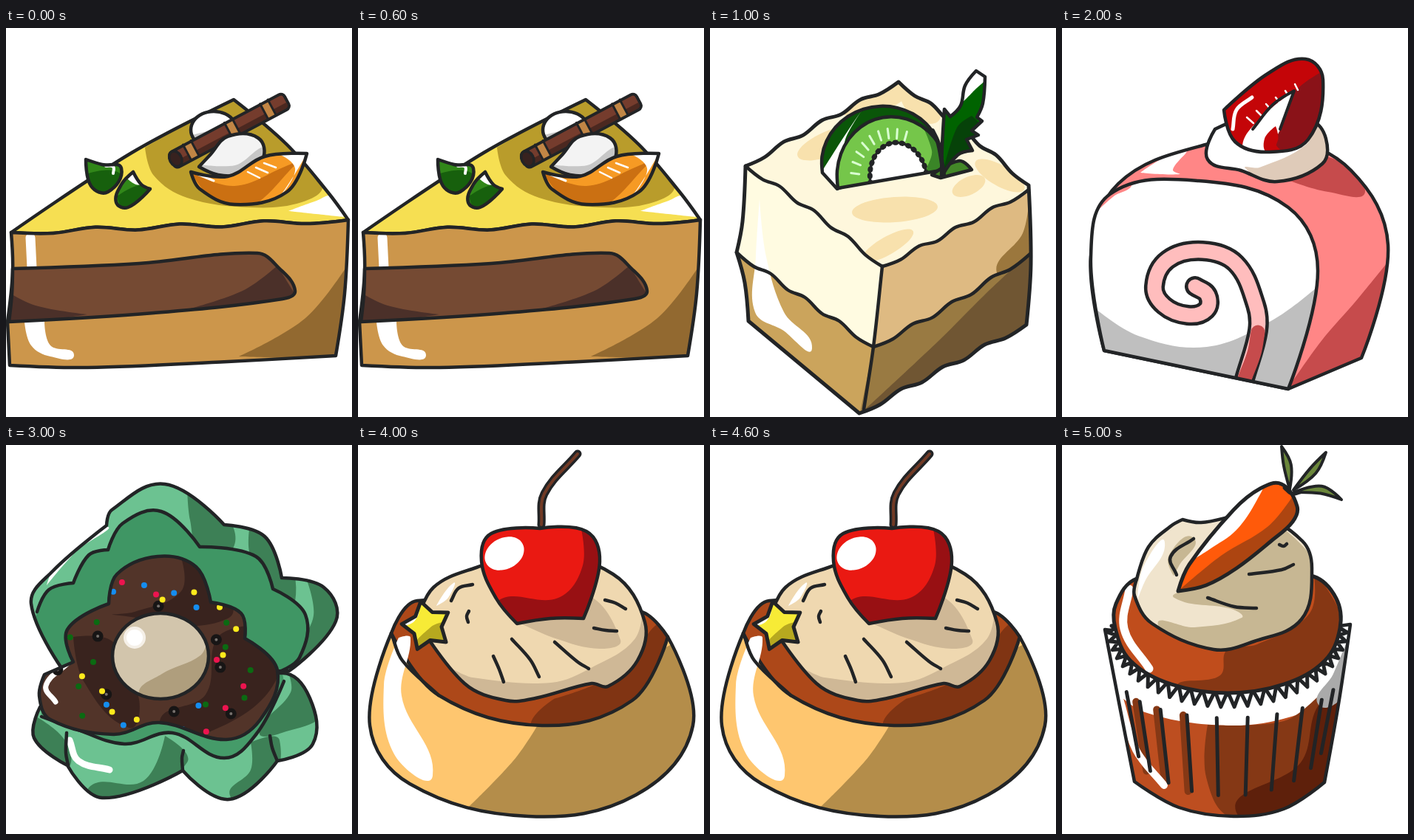
An HTML page for the animation above (6 s loop, 468 px wide and 527 px high).

```html
<!DOCTYPE html>
<html lang="en">
<head>
<meta charset="utf-8">
<title>Desserts</title>
<style>
html, body { margin: 0; width: 100%; height: 100%; overflow: hidden; background: #fff; }
svg { display: block; width: 100vw; height: 100vh; }
.ink { fill: none; stroke: #222426; stroke-linecap: round; stroke-linejoin: round; }
</style>
</head>
<body>
<svg id="stage" viewBox="0 0 468 527"></svg>
<script>
const INK = '#222426';

// Smooth curve through "x,y" points; a trailing "!" makes a hard corner.
function curve(text, closed) {
  const pts = text.trim().split(/\s+/).map(t => {
    const [x, y] = t.split(',').map(parseFloat);
    return { x, y, hard: t.endsWith('!') };
  });
  const n = pts.length;
  const at = i => closed ? pts[(i + n) % n] : pts[Math.max(0, Math.min(n - 1, i))];
  const dir = i => {
    if (at(i).hard) return [0, 0];
    const dx = at(i + 1).x - at(i - 1).x, dy = at(i + 1).y - at(i - 1).y;
    const len = Math.hypot(dx, dy) || 1;
    return [dx / len, dy / len];
  };
  let d = `M${pts[0].x} ${pts[0].y}`;
  for (let i = 0; i < n - (closed ? 0 : 1); i++) {
    const a = at(i), b = at(i + 1), u = dir(i), v = dir(i + 1);
    const h = Math.hypot(b.x - a.x, b.y - a.y) * 0.36;
    d += `C${a.x + u[0] * h} ${a.y + u[1] * h} ${b.x - v[0] * h} ${b.y - v[1] * h} ${b.x} ${b.y}`;
  }
  return d + (closed ? 'Z' : '');
}

// Point generators
const times = (n, f) => Array.from({ length: n }, (_, i) => f(i));
const point = (x, y) => x.toFixed(1) + ',' + y.toFixed(1);

function polar(cx, cy, rx, ry, deg, tilt = 0) {
  const a = deg * Math.PI / 180, t = tilt * Math.PI / 180;
  const x = rx * Math.cos(a), y = ry * Math.sin(a);
  return point(cx + x * Math.cos(t) - y * Math.sin(t), cy + x * Math.sin(t) + y * Math.cos(t));
}

const arc = (cx, cy, rx, ry, tilt = 0, from = 0, to = 330, n = 11) =>
  times(n + 1, i => polar(cx, cy, rx, ry, from + (to - from) * i / n, tilt)).join(' ');

function dome(x0, y0, x1, y1, h) {
  const tilt = Math.atan2(y1 - y0, x1 - x0) * 180 / Math.PI;
  return arc((x0 + x1) / 2, (y0 + y1) / 2, Math.hypot(x1 - x0, y1 - y0) / 2, h, tilt, 180, 360)
    .replace(/^\S+/, '$&!') + '!';
}

function wavy(x0, y0, x1, y1, amp = 3, bow = 0, n = 8) {
  return times(n + 1, i => {
    const t = i / n, end = i === 0 || i === n;
    const lift = end ? 0 : (i % 2 ? amp : -amp) + bow * Math.sin(Math.PI * t);
    return point(x0 + (x1 - x0) * t, y0 + (y1 - y0) * t + lift) + (end ? '!' : '');
  }).join(' ');
}

let seed = 7;
const random = () => (seed = seed * 16807 % 2147483647) / 2147483647;

// Drawing helpers
let clips = 0;
const fill = (color, pts) => `<path fill="${color}" d="${curve(pts, true)}"/>`;
const brush = (color, w, pts, dash = 'none') =>
  `<path fill="none" stroke="${color}" stroke-width="${w}" stroke-linecap="round" stroke-linejoin="round" stroke-dasharray="${dash}" d="${curve(pts)}"/>`;
const line = (pts, w = 4.5) => brush(INK, w, pts);
const lines = (...list) => list.map(p => line(p)).join('');
const tube = (color, w, rim, pts) => brush(INK, w, pts) + brush(color, w - rim, pts);
const disc = (color, r, p) => `<circle cx="${p.split(',')[0]}" cy="${p.split(',')[1]}" r="${r}" fill="${color}"/>`;

// Outlined shape whose shading is clipped to its outline.
function form(color, pts, inside = '', w = 4.5) {
  const id = 'c' + clips++, d = curve(pts, true);
  return `<clipPath id="${id}"><path d="${d}"/></clipPath><g clip-path="url(#${id})">` +
    `<path fill="${color}" d="${d}"/>${inside}</g><path class="ink" stroke-width="${w}" d="${d}"/>`;
}

function wafer(x, y, angle, length) {
  const bands = [.17, .53, .84].map(t => {
    const s = length * t;
    return `<path stroke="#c18645" stroke-width="11" d="M${s} -12V12"/>` +
      `<path class="ink" stroke-width="3" d="M${s - 6} -12V12M${s + 6} -12V12"/>`;
  }).join('');
  return `<g transform="translate(${x} ${y}) rotate(${angle})">` +
    `<rect y="-11" width="${length}" height="23" rx="6" fill="#753c2d"/>` +
    `<path fill="#4b2820" d="M4 3H${length - 2}V10H4Z"/>${bands}` +
    `<rect y="-11" width="${length}" height="23" rx="6" class="ink" stroke-width="4"/>` +
    `<ellipse cx="6" rx="8" ry="11" fill="#37221f" stroke="${INK}" stroke-width="3.5"/></g>`;
}

function slice() {
  const edge = wavy(7, 277, 463, 260);
  return form('#f6df52', edge + ' 435,222 380,158 308,97! 170,169',
      fill('#b99c2b', '188,162! 200,200 245,230 330,243 400,236 428,212 380,140 308,90!') +
      fill('#fff', '382,248! 420,234 442,228 457,256!')) +
    form('#cc964b', edge + ' 458,360 446,444! 300,452 110,460 5,457! 2,398! 9,330',
      fill('#926930', '464,318! 405,393 315,445! 468,450!') +
      brush('#fff', 13, '33,284 35,325') +
      fill('#fff', '25,398! 52,397! 60,430 92,443 60,445 34,430')) +
    form('#754a33', '9,326! 180,319 340,305 369,325 391,356 374,367 200,386 4,398! 8,360',
      fill('#4b3029', '0,356! 40,376 110,388! 0,405!') +
      fill('#4b3029', '367,322! 320,356 235,384! 400,375!')) +
    form('#318719', '108,178! 130,185 156,190 138,222 115,214',
      fill('#17600d', '108,198! 155,198 138,230') + brush('#fff', 4, '135,187 145,188 145,197')) +
    form('#318719', '172,195! 183,212 195,218! 165,243 149,236 156,212',
      fill('#17600d', '150,228! 196,216 165,250') + fill('#fff', '160,200! 173,194 182,212')) +
    form('#fff', arc(281, 138, 31, 25), fill('#c8c8c8', '248,146! 280,138 315,130 280,170')) +
    wafer(224, 180, -28, 176) +
    form('#f3f3f3', '261,188! 276,172 300,147 341,149 347,178 317,198 287,199',
      fill('#c7c7c7', '262,185! 310,186 352,166 317,205 275,200')) +
    form('#f69a24', '250,195! 300,201 350,174 407,170! 380,222 309,239 262,218',
      fill('#cb7012', '250,195! 309,214 379,187 397,180 310,248') +
      fill('#fff', '362,168! 410,165! 372,226 391,190') + brush('#fff', 3, '259,198 281,207') +
      times(3, i => brush('#fff', 2.5, `${327 + i * 11},${195 - i * 6} ${343 + i * 11},${203 - i * 7}`)).join(''));
}

function cube() {
  const left = wavy(48, 187, 233, 323, 3, -5), right = wavy(233, 323, 431, 219, 3, 2);
  const midLeft = wavy(36, 304, 221, 432, 3), midRight = wavy(221, 432, 433, 306, 3, 5);
  const patches = [[225, 98, 48, 17, -20], [165, 155, 50, 17, -22], [285, 105, 32, 18, 40],
    [250, 246, 58, 17, -4], [240, 295, 40, 12, -30], [392, 200, 38, 14, 30], [350, 214, 24, 12, -25]];
  const rays = times(9, i => brush('#d9ffd0', 3, polar(249, 204, 47, 55, 195 + i * 13, -10) + ' ' + polar(249, 204, 58, 68, 195 + i * 13, -10)));
  const core = dome(217, 210, 293, 198, 49);
  return form('#fef7dc', [wavy(48, 187, 255, 73, 3, -2), wavy(255, 73, 431, 213, 3, -4),
        '434,320', wavy(428, 402, 202, 522, 3), '52,397! 47,345 36,304! 44,262'].join(' '),
      patches.map(p => fill('#f8e1ad', arc(...p))).join('') +
      fill('#fffbe1', left + ' 221,432! 207,527! 0,527! 0,187!') +
      fill('#deba82', right + ' 468,219! 468,527! 205,527! 221,432!') +
      fill('#9b773d', '431,240! 423,278 389,334 440,315!') +
      fill('#cba45c', midLeft + ' 207,527! 0,527! 0,304!') +
      fill('#997a42', midRight + ' 468,306! 468,527! 202,527!') +
      fill('#705633', '434,303! 371,362 309,424 204,522! 468,527!') +
      fill('#fff', '67,232! 76,310 100,385 138,434 98,409 61,385 62,310'), 5) +
    lines(left, right, midLeft, midRight, '233,323 221,432 208,517') +
    form('#0a5609', '172,218! ' + dome(152, 196, 312, 168, 76),
      fill('#fff', '148,200! 203,115 183,151 171,222')) +
    form('#75c64a', dome(173, 217, 323, 191, 84),
      fill('#3a8527', '281,120! 300,166 296,200 335,195! 310,140') + rays.join('') + fill('#fff', core) +
      brush(INK, 7, core, '1 8') + line(core, 3.5)) +
    form('#438728', '300,199! 337,180 354,192! 312,203!') +
    form('#006300', '317,110! 325,120! 339,105 345,78 360,58! 372,66! 369,102 361,121! 368,126! 354,139! 363,145! 347,151! 355,166! 335,172 313,202! 314,160',
      fill('#fff', '336,106! 346,74 360,57 376,62 356,86') +
      fill('#064209', '354,119! 334,135 314,200! 370,146')) +
    line('301,139 309,157 316,198', 6);
}

function roll() {
  const coil = '180,350 197,362 195,382 170,389 138,376 125,350 143,314 190,302 235,319 262,375 265,410 247,475';
  return form('#ff8686', '57,437! 39,310 76,211 198,157 300,150 391,193 441,294 405,447! 306,489!',
      fill('#c64b4c', '443,314! 400,367 350,425 303,492! 410,455!') +
      fill('#c64b4c', '300,204! 337,197 358,174 410,220 360,222') +
      fill('#fff', '106,196! 166,166 150,192 159,198')) +
    form('#fff', '57,437! 39,310 65,225 185,207 306,243 346,329 306,489!',
      fill('#bfbfbf', '40,376! 103,417 196,432 286,395 352,345! 350,500! 50,500!') +
      fill('#ff8686', '40,255! 75,205 95,211 70,228') +
      tube('#ffbdbd', 28, 9, coil) + brush('#c64b4c', 19, '265,412 260,440 247,475')) +
    form('#fff', '207,137! 197,178 242,193 291,208 352,184 357,150 337,125 270,115',
      fill('#dfcbb9', '346,123! 330,158 267,189 248,190 291,213 360,185')) +
    form('#c40508', '219,111! 278,62 329,42 353,70 333,151 279,168 234,154',
      fill('#8a1218', '354,58! 314,88 288,155 340,165') +
      fill('#fff', '314,85! 297,134 270,170 244,161 272,119') +
      fill('#c40508', '289,133! 274,150 278,168 292,152') +
      brush('#fff', 5, '257,94 236,111 231,137') +
      times(6, i => brush('#fff', 2.5, `${250 + i * 13},${121 - i * 9} ${259 + i * 12},${129 - i * 9}`)).join('')) +
    line('258,137 285,104 314,85! 295,137', 4);
}

function shell() {
  const light = '#6cc291', dark = '#3d8056';
  const rim = '42,226! 58,196 91,187! 112,149 138,142! 158,106 210,90 262,138! 338,151 361,195! 405,230 397,288 367,308!';
  const lip = '48,368! 90,383 160,405 225,390 295,424 339,391 376,320!';
  const around = (angle, spread) => polar(203, 291, 82 + 58 * spread, 68 + 48 * spread, angle);
  const holes = times(11, i => around(i * 33 + 8, i % 2 * .8 + .1));
  const colors = ['#ed144f', '#0b6a12', '#ffea1c', '#158df0'];
  return form(light, '80,309! 34,215 63,171 136,109! 143,88 215,53 295,108! 350,124 373,180! 430,193 446,239 383,306!',
      fill(dark, '245,55! 249,102 264,145 307,140 295,90') +
      fill(dark, '330,107! 330,148 364,212 391,212 376,140') +
      fill(dark, '405,178! 416,231 387,310 460,300 452,205') +
      fill('#3f9664', rim + ' 60,315! 34,255!') +
      fill('#fff', '55,190! 77,145 135,111 95,144')) +
    line(rim) +
    form(light, '46,355! 38,397 83,434! 130,478 239,441! 302,480 367,428! 415,405 411,343 374,309 200,340',
      fill(dark, '32,363! 79,399 82,440 44,425') +
      fill(dark, '215,394! 186,455 113,463 150,488 245,430') +
      fill(dark, '331,403! 331,440 303,475 347,482 370,400') +
      fill(dark, '382,309! 385,335 343,389 373,390 430,357') +
      fill('#459b69', lip + ' 372,300! 47,350!') +
      brush('#fff', 9, '86,400 98,428 140,440') +
      lines('82,390 81,417 84,434', '239,441 238,424 240,414', '367,428 360,410 357,394')) +
    line(lip) +
    form('#523429', '52,311! 91,294! 83,250 139,215! 150,175 205,151 257,165 277,213! 318,228 323,262! 367,305 344,372 298,399 207,376 145,392 60,372 45,340',
      fill('#39231e', '237,153! 237,198 174,226 145,230 300,235 275,170') +
      fill('#39231e', '91,260! 145,267 180,345 166,383 105,320') +
      fill('#39231e', '325,245! 285,262 270,338 208,376 267,392 369,310') +
      brush('#fff', 7, '83,296 54,326 67,348') +
      holes.map(p => disc('#171515', 7.5, p) + disc('#77716d', 2, p)).join('') +
      times(38, i => disc(colors[i % 4], 4, around(i * 137.5, random()))).join('')) +
    form('#d2c5ac', arc(209, 286, 65, 58),
      fill('#af9e7d', '274,260! 263,285 211,310 180,339 222,358 285,323') +
      disc('#f5f0e8', 15, '174,261') + disc('#fff', 11, '174,261'));
}

function pudding() {
  const star = times(10, i => polar(93, 245, i % 2 ? 20 : 34, i % 2 ? 20 : 34, i * 36 - 104) + '!').join(' ');
  return form('#fec66f', '45,255! 16,380 70,459 230,503 376,474 453,380 419,260! 230,240',
      fill('#b48d4a', '251,366! 214,423 150,490! 290,530! 468,470! 460,250!')) +
    form('#ad4819', '45,255! 80,211 380,225 419,260! 371,346 249,380 109,339',
      fill('#803413', '265,344! 235,385 300,400 425,340 428,240 350,310')) +
    fill('#fff', '55,261! 71,261 59,340 101,448 49,419 35,325') +
    line('45,255 60,292 109,339') +
    form('#efd8b0', '80,239! 102,193 160,166 240,145 345,175 388,240 378,292 338,327 316,323 240,343 200,346 144,323',
      fill('#cfb896', '385,211! 375,262 317,301 261,322 155,315 126,304 200,355 345,335 400,265') +
      fill('#cfb896', '206,235! 267,262 327,276 355,264 300,200') +
      fill('#fff', '106,218! 129,187 122,207') +
      lines('126,211 136,194 155,189', '150,225 147,232 149,240', '183,286 191,304 197,321',
        '208,263 233,291 245,314', '266,267 296,293 312,303', '334,210 348,214 362,222', '319,248 335,251 350,252')) +
    form('#ea1912', '167,157 180,120 246,113! 309,117 327,158 305,235! 260,235 215,242! 187,208',
      fill('#981013', '300,105! 304,163 271,207 188,212 210,255 310,245 340,155') +
      fill('#fff', arc(198, 147, 28, 21, -28))) +
    tube('#713a25', 11, 7, '248,108 252,66 297,12') +
    form('#f7eb36', star,
      fill('#b7a91f', '124,238! 98,247 78,280 126,280') + fill('#fff', '58,246! 62,231 80,222 76,239'), 5);
}

function cupcake() {
  const toothCount = 28;
  const teeth = times(toothCount * 2 + 1, i =>
    polar(224, 248, i % 2 ? 162 : 152, i % 2 ? 107 : 86, 180 - i * 90 / toothCount) + '!').join(' ');
  const pleat = (i, shift = 0) => {
    const deg = 197 + i * 16.6;
    return polar(226 + shift, 320, 145, -50, deg) + ' ' + polar(226 + shift, 400, 128, -75, deg);
  };
  // Slim leaf from stem to tip, bowed sideways.
  const leaf = (x, y, tipX, tipY, bow) => {
    const dx = tipX - x, dy = tipY - y, len = Math.hypot(dx, dy);
    const side = s => point(x + dx * .55 - dy / len * s, y + dy * .55 + dx / len * s);
    return form('#6b873b', `${x},${y}! ${side(bow - 5)} ${tipX},${tipY}! ${side(bow + 5)}`, '', 4);
  };
  return form('#fff', '58,250! 78,354 98,456! 158,491 232,503 300,493 355,457! 374,351 390,243! 220,260',
      fill('#bd4e20', '65,327! 112,362 225,380 310,368 386,333! 368,510! 90,510!') +
      fill('#853815', '197,379! 195,450 230,505 365,505 388,330 300,374') +
      fill('#5e200b', '382,335! 346,354 323,430 237,500 360,500') +
      fill('#aaa', '392,250! 367,310 347,352 385,333') +
      times(3, i => brush('#853815', 10, pleat(i + 1, -5))).join('') +
      brush('#fff', 10, '78,344 100,413 138,461')) +
    times(10, i => line(pleat(i), 5)).join('') +
    form('#fff', teeth + ' 372,233! 224,220! 67,245!', '', 5) +
    form('#c04d1c', arc(224, 248, 152, 88, 0, 0, 180, 6) + ' 73,215 101,181 220,160 340,178 371,208',
      fill('#863714', '340,170! 335,228 264,270 223,278 214,312 157,331 230,345 325,325 385,265') +
      brush('#fff', 11, '91,195 84,249 118,303'), 5) +
    form('#f0e4cd', '101,182! 117,138 147,110 163,101! 188,105 263,95 325,130 338,168 324,236 260,266 205,277 122,242 98,204',
      fill('#c7b793', '303,116! 255,151 177,192 152,207 229,222 243,234 179,247 130,244 190,285 310,265 350,180') +
      fill('#c7b793', '151,177! 144,151 178,126 158,164') +
      fill('#fff', '102,210! 110,165 139,132 112,185') +
      lines('155,176 147,151 178,127', '197,207 233,219 263,221', '253,175 297,169 313,162', '294,135 300,137 304,134')) +
    leaf(308, 60, 297, 2, 3) + leaf(313, 61, 357, 10, 3) + leaf(314, 64, 378, 74, -9) +
    form('#ff5a0a', '157,198! 172,162 232,88 268,59 297,53 318,83 312,104 283,130 236,167 195,190',
      fill('#ad4511', '313,68! 279,110 215,150 157,198! 205,200 330,112') +
      fill('#fff', '178,155! 232,82 270,54 264,74 236,115 200,141'), 5) +
    line('301,58 311,66 322,64', 5);
}

const scenes = [slice, cube, roll, shell, pudding, cupcake];
const hold = 1000, loop = hold * scenes.length;
const stage = document.getElementById('stage');
stage.innerHTML = scenes.map(draw => `<g>${draw()}</g>`).join('');
[...stage.children].forEach((scene, i) => scene.animate([
  { opacity: 1, offset: 0, easing: 'step-end' },
  { opacity: 0, offset: 1 / scenes.length, easing: 'step-end' },
  { opacity: 0, offset: 1 }
], { duration: loop, delay: i * hold - loop, iterations: Infinity }));
</script>
</body>
</html>
```
